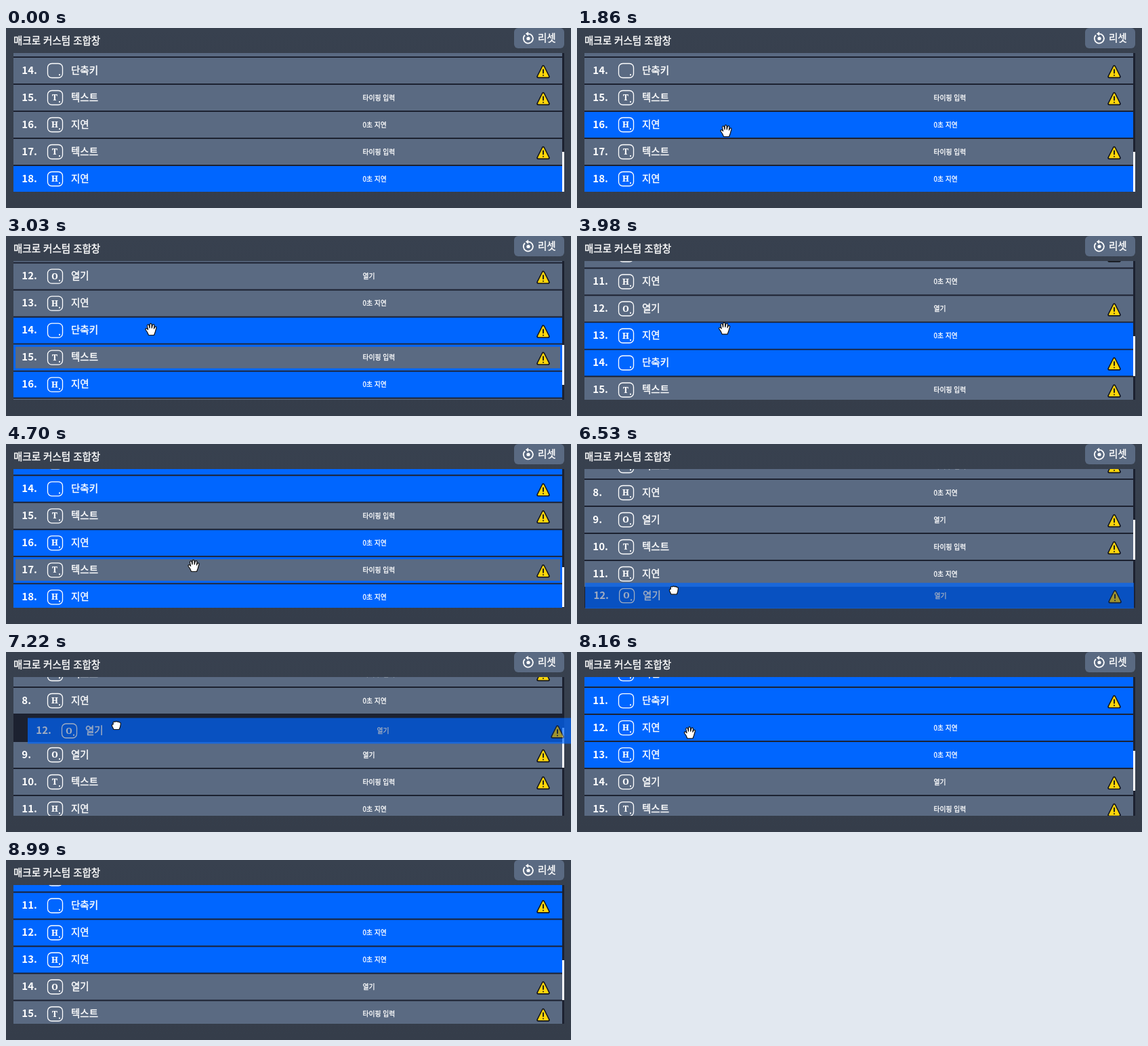
An HTML page for the animation above (9.72 s loop, 834 by 266 pixels).

```html
<!DOCTYPE html>
<html lang="ko">
<head>
<meta charset="utf-8">
<style>
html, body { margin: 0; width: 100%; height: 100%; overflow: hidden; background: #363f4d; }
svg { display: block; width: 834px; height: 266px; }
text { fill: #fff; stroke: #fff; stroke-width: .4; font: 14.5px "Noto Sans CJK KR", "Noto Sans KR", "Noto Sans CJK JP", sans-serif; }
.num { font-size: 15px; font-weight: 700; stroke: none; }
.note { font-size: 9.8px; stroke-width: .3; }
.key { font: 700 12px "Noto Serif", serif; text-anchor: middle; stroke-width: .2; }
.hand { fill: #fff; stroke: #111; stroke-width: 1.2; stroke-linejoin: round; }
</style>
</head>
<body>
<svg viewBox="0 0 834 266">
  <defs>
    <linearGradient id="bg" x2="0" y2="1">
      <stop stop-color="#38414f"/><stop offset="1" stop-color="#353d4a"/>
    </linearGradient>
    <clipPath id="view"><rect x="11" y="37" width="813" height="205"/></clipPath>
  </defs>
  <rect width="834" height="266" fill="url(#bg)"/>
  <text x="11" y="23.5">매크로 커스텀 조합창</text>
  <rect x="750" width="74" height="30" rx="6" fill="#5a6a82"/>
  <path d="M766 10.5 A7 7 0 1 0 771.5 8.6 H769" fill="none" stroke="#fff" stroke-width="1.8"/>
  <path d="M771 5.4 V11.8 L766.8 8.6Z" fill="#fff"/>
  <circle cx="771" cy="15.5" r="2.6" fill="#fff"/>
  <text x="785" y="19.5">리셋</text>
  <g clip-path="url(#view)">
    <rect x="11" y="37" width="813" height="205" fill="#1c2130"/>
    <g id="list"></g>
    <rect id="thumb" x="821" width="3" height="59" fill="#fff"/>
  </g>
  <g id="drag" opacity=".7"></g>
  <g id="cursor" class="hand">
    <path id="open" d="M-3.5 8.5 L-5.5 4 L-8 .5 Q-8.2 -2 -5.6 -1 L-4.4 .3 L-5.6 -5.5 Q-5 -8 -3 -6.5 L-2 -2 L-1.8 -7.5 Q-.4 -9.8 1 -7.5 L1.2 -2 L2.4 -6.7 Q4.5 -8.2 5 -6 L4.4 -1 L5.8 -3.7 Q8 -4.8 8 -2.5 L6.2 4 L4.5 8.5Z"/>
    <path id="fist" d="M-4 6.5 L-6.5 1.5 Q-7 -1.4 -4.8 -1.2 L-4.9 -3.8 Q-3.5 -6 -2 -4.7 Q-.5 -6.3 1 -4.8 Q2.8 -5.8 3.7 -4.2 Q6.5 -4.5 6.3 -1.5 L5.5 3 L4 6.5Z"/>
  </g>
</svg>
<script>
const LOOP = 9720, PITCH = 40, TOP = 39, VIEW = 205, TOTAL = 720;
const GREY = '#5a6a82', BLUE = '#0066ff', SLOT = 8, HELD = 11;
const ENTER = 400, GRAB = 6120, DRAG = 6390, RELEASE = 7290, DROP = 7425, LEAVE = 8980;
const kinds = {
  O: ['O', '열기', '열기', true],
  T: ['T', '텍스트', '타이핑 입력', true],
  H: ['H', '지연', '0초 지연', false],
  K: ['', '단축키', '', true]
};
const items = [...'OTHTOHTHOTHOHKTHTH'];
const clicks = { 17: 0, 15: 1800, 13: 2400, 12: 3500, 11: 4200 };   // item: time it gets selected
const first = items.map((_, i) => i);
const rest = first.filter(i => !(i in clicks));
const second = [...rest.slice(0, SLOT), ...first.filter(i => i in clicks), ...rest.slice(SLOT)];

// Wheel notches: start, duration, direction.
const NOTCH = 124.5, BOTTOM = TOTAL - VIEW, HOVER_LAG = 100;
const wheel = [[2800, 400, -1], [4490, 130, 1], [4670, 320, -1], [5230, 190, -1], [7860, 340, 1]];

// Hand moves: start, end, x, y; the hand rests in between.
const moves = [
  [400, 600, 232, 150], [800, 1080, 210, 207], [1130, 1270, 212, 190], [1450, 1530, 214, 158],
  [1720, 1850, 220, 152], [1990, 2300, 216, 66], [2450, 2690, 214, 138], [3300, 3700, 216, 150],
  [3780, 4370, 222, 100], [4440, 4590, 277, 180], [4780, 5315, 290, 186], [5500, 5850, 141, 227],
  [6370, 7215, 163, 108], [7890, 8440, 170, 131], [8630, 8990, 185, 276]
];

const $ = id => document.getElementById(id);
const set = (el, name, value) => el.setAttribute(name, value);
const smooth = v => (v = Math.max(0, Math.min(1, v)), v * v * (3 - 2 * v));
const mix = (a, b, p) => a + (b - a) * p;
const move = (el, x, y) => set(el, 'transform', `translate(${x} ${y})`);
const show = (el, on) => { el.style.display = on ? '' : 'none'; };

const scrollAt = t => wheel.reduce((s, [t0, d, dir]) => s + dir * NOTCH * smooth((t - t0) / d), BOTTOM);

const handAt = t => moves.reduce(([x, y], [t0, t1, mx, my]) => {
  const p = smooth((t - t0) / (t1 - t0));
  return [mix(x, mx, p), mix(y, my, p)];
}, [824, 256]);

function makeRow(parent, kind, dim) {
  const [key, label, note, warn] = kinds[kind];
  const g = document.createElementNS('http://www.w3.org/2000/svg', 'g');
  g.innerHTML = `
    <rect width="810" height="38" fill="${GREY}"/>
    <rect x="1.5" y="1.5" width="807" height="35" fill="none" stroke="${BLUE}" stroke-width="3"/>
    <g opacity="${dim}">
      <text class="num" x="12.3" y="23.5"></text>
      <rect x="50.5" y="8.5" width="22" height="21" rx="6" fill="none" stroke="#fff" stroke-width="1.3"/>
      <text class="key" x="61" y="23.2">${key}</text>
      <rect x="67" y="24.2" width="2" height="2" fill="#fff"/>
      <text x="85" y="23.5">${label}</text>
      <text class="note" x="515.5" y="22.7">${note}</text>
    </g>
    ${warn ? `<g opacity="${dim}" stroke-linejoin="round" stroke-linecap="round">
      <path d="M782 13 L789.6 28 H774.4Z" fill="#14161c" stroke="#14161c" stroke-width="4.4"/>
      <path d="M782 13.6 L789 27.6 H775Z" fill="#ffd60a" stroke="#ffd60a" stroke-width="2"/>
      <path d="M782 17.5 V22.6 M782 26 V26.1" stroke="#14161c" stroke-width="1.9"/>
    </g>` : ''}`;
  parent.append(g);
  return { g, fill: g.children[0], ring: g.children[1], num: g.querySelector('.num') };
}

const rows = items.map(k => makeRow($('list'), k, 1));
const ghost = makeRow($('drag'), items[HELD], .85);
set(ghost.fill, 'fill', BLUE);
ghost.num.textContent = HELD + 1 + '.';
show(ghost.ring, false);

// Hover trails a moving list a little.
function hoverAt(t, x, y) {
  if (x < 11 || x > 821 || y < 37 || y > 242) return -1;
  const pos = y + scrollAt(t - HOVER_LAG) - TOP;
  return pos % PITCH < 38 ? Math.floor(pos / PITCH) : -1;
}

function draw(t) {
  const scroll = scrollAt(t), [x, y] = handAt(t);
  const inside = t >= ENTER && t < LEAVE;
  const dragging = t >= DRAG && t < DROP;
  const closed = t >= GRAB && t < DROP;
  const hover = inside && !dragging ? hoverAt(t, x, y) : -1;
  const back = smooth((t - RELEASE) / (DROP - RELEASE));
  const ghostX = mix(x - 131, 11, back);
  const ghostY = mix(y - 10.5, TOP + SLOT * PITCH - scroll, back);

  (t < DROP ? first : second).forEach((item, i) => {
    const row = rows[item];
    let top = TOP + i * PITCH - scroll;
    // Rows make room as the held one passes them.
    if (dragging && i < HELD) top += PITCH * smooth((top + 28 - ghostY) / 16);
    move(row.g, 11, top);
    show(row.g, !(dragging && item === HELD));
    set(row.fill, 'fill', t >= clicks[item] ? BLUE : GREY);
    show(row.ring, i === hover);
    row.num.textContent = i + 1 + '.';
  });

  set($('thumb'), 'y', Math.floor(37 + scroll * VIEW / TOTAL));
  show(ghost.g, dragging);
  move(ghost.g, ghostX, ghostY);
  show($('cursor'), inside);
  show($('open'), !closed);
  show($('fist'), closed);
  move($('cursor'), x, y);
}

function tick() {
  draw(performance.now() % LOOP);
  requestAnimationFrame(tick);
}
tick();
</script>
</body>
</html>
```
